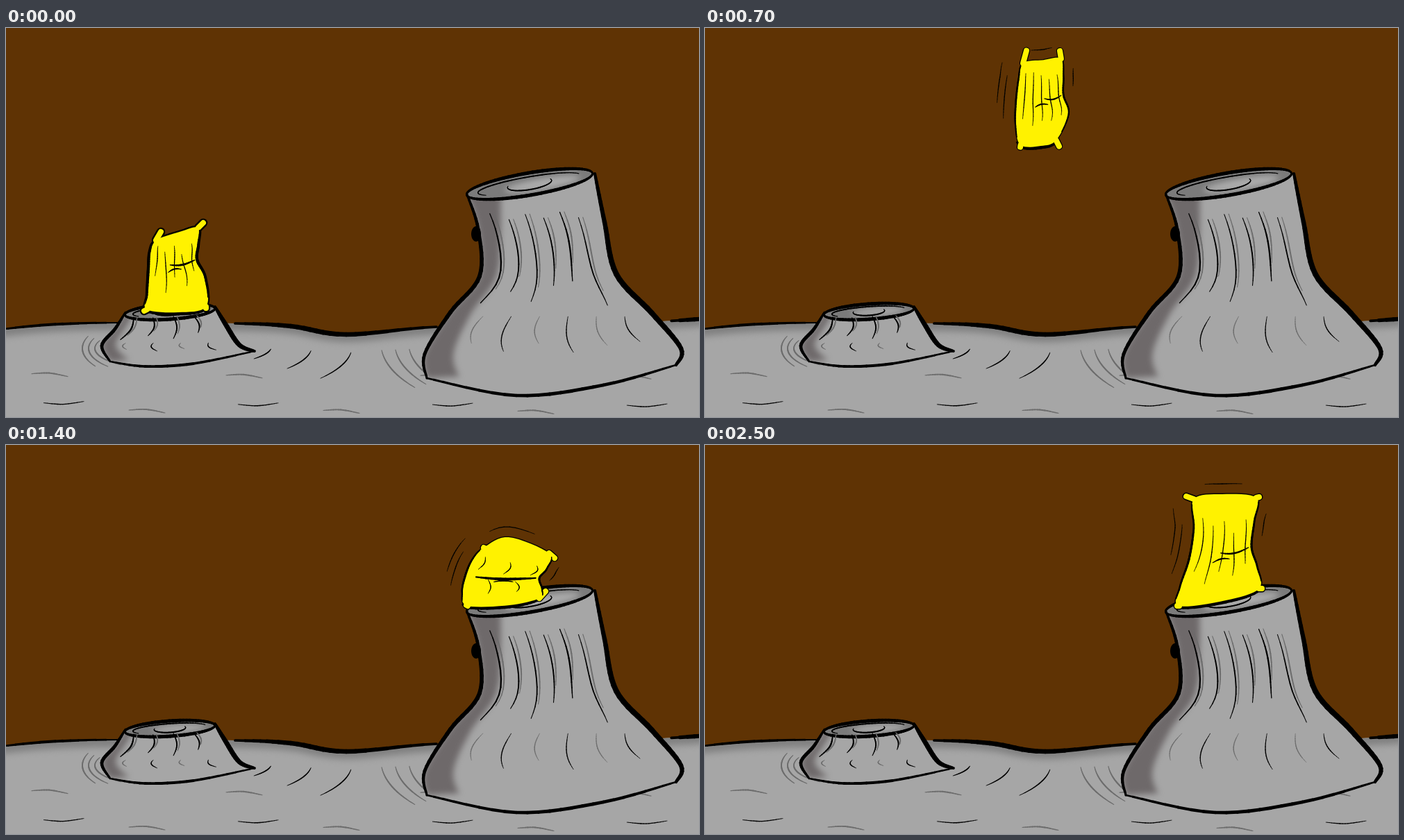
Recreate the animation shown at these times as an HTML page with a canvas. Size 998 by 561 pixels, loop 2600 ms.

```html
<!DOCTYPE html>
<html lang="en">
<head>
<meta charset="utf-8">
<title>Hopping sack</title>
<style>
html, body { margin: 0; width: 100%; height: 100%; overflow: hidden; background: #5f3304; }
canvas { display: block; width: 100vw; height: 100vh; }
</style>
</head>
<body>
<canvas id="stage" width="998" height="561"></canvas>
<script>
const W = 998, H = 561, STEP = 100, STEPS = 26, SMOOTH = 8;
const BROWN = '#5f3304', GREY = '#a6a6a6', MID = '#6d6d6d', DARK = '#6e696a', YELLOW = '#fff200';
const stage = document.getElementById('stage').getContext('2d');

const points = s => s.split(' ').map(p => p.split(',').map(Number));
const mix = (a, b, t) => a + (b - a) * t;
const mixPt = (p, q, t) => [mix(p[0], q[0], t), mix(p[1], q[1], t)];
const rnd = n => { const v = Math.sin(n * 127.1 + 3) * 43758.5; return v - Math.floor(v); };
const times = (n, f) => Array.from({ length: n }, (_, i) => f(i));

// Catmull-Rom samples through the points
function curve(pts, closed) {
  const n = pts.length, out = [], segs = closed ? n : n - 1;
  const at = i => closed ? pts[(i + n) % n] : pts[Math.max(0, Math.min(n - 1, i))];
  for (let i = 0; i < segs; i++) {
    const [a, b, c, d] = times(4, k => at(i + k - 1));
    for (let k = 0; k < SMOOTH; k++) {
      const t = k / SMOOTH;
      out.push([0, 1].map(j => b[j] + 0.5 * t * (c[j] - a[j] +
        t * (2 * a[j] - 5 * b[j] + 4 * c[j] - d[j] + t * (3 * (b[j] - c[j]) + d[j] - a[j])))));
    }
  }
  if (!closed) out.push(pts[n - 1]);
  return out;
}

// Surface between two edges: u runs across, v along them
function patch(left, right) {
  const l = curve(left), r = curve(right);
  const on = (c, v) => {
    const x = Math.max(0, Math.min(1, v)) * (c.length - 1), i = Math.min(c.length - 2, Math.floor(x));
    return mixPt(c[i], c[i + 1], x - i);
  };
  return (u, v) => mixPt(on(l, v), on(r, v), u);
}

function path(g, pts) {
  g.beginPath();
  pts.forEach(p => g.lineTo(...p));
}

function fill(g, pts, color) {
  path(g, pts);
  g.fillStyle = color;
  g.fill();
}

// Stroke along samples, thin at both ends
function pen(g, pts, width, color = '#000') {
  const n = pts.length - 1;
  g.strokeStyle = color;
  g.lineCap = 'round';
  for (let i = 0; i < n; i++) {
    g.lineWidth = width * (0.5 + 0.5 * Math.sin(Math.PI * (i + 0.5) / n));
    path(g, [pts[i], pts[i + 1]]);
    g.stroke();
  }
}

// Line on a patch, slightly bowed
const grain = (at, u, v0, v1, bow = 0) =>
  times(13, i => at(u + bow * Math.sin(Math.PI * i / 12), mix(v0, v1, i / 12)));

function arc(cx, cy, rx, ry, a0, a1, tilt = 0) {
  const c = Math.cos(tilt), s = Math.sin(tilt);
  return times(41, i => {
    const a = mix(a0, a1, i / 40), x = rx * Math.cos(a), y = ry * Math.sin(a);
    return [cx + x * c - y * s, cy + x * s + y * c];
  });
}

// Soft shading kept inside a shape
function shade(g, shape, blur, draw) {
  g.save();
  path(g, shape);
  g.clip();
  g.filter = `blur(${blur}px)`;
  draw();
  g.restore();
}

function drawGround(g) {
  const edge = curve(points('-20,436 60,428 160,425 330,426 410,430 490,442 620,431 800,428 945,423 1020,418'));
  const land = [...edge, [1020, 580], [-20, 580]];
  fill(g, land, GREY);
  shade(g, land, 5, () => {
    path(g, edge);
    g.strokeStyle = '#808080';
    g.lineWidth = 22;
    g.stroke();
  });
  const span = (a, b) => edge.filter(p => p[0] > a && p[0] < b);
  pen(g, span(-20, 165), 4);
  pen(g, span(315, 630), 7);
  pen(g, span(945, 1020), 6);

  // marks circling the stumps
  for (let i = 0; i < 3; i++) {
    pen(g, arc(240, 462, 112 + 9 * i, 32 + 9 * i, 2.3 + 0.15 * i, 3.5), 2, MID);
    pen(g, arc(240, 460, 142 + 58 * i, 30 + 25 * i, 0.1, 0.6), 1.5);
    pen(g, arc(785, 455, 205 + 20 * i, 90 + 8 * i, 2.5, 3.05), 2, MID);
  }
  // loose ripples
  for (let i = 0; i < 7; i++) {
    const x = 62 + 140 * i, y = 497 + 48 * (i % 2) + 8 * rnd(i);
    pen(g, curve([[x - 25, y], [x, y - 1], [x + 27, y + 4]]), 2, MID);
    pen(g, curve([[x - 8, y + 42], [x + 20, y + 44], [x + 50, y + 40]]), 1.4);
  }
}

function drawRim(g, { cx, cy, rx, ry, tilt }) {
  const ring = k => arc(cx, cy, rx * k, ry * k, 0, 2 * Math.PI, tilt);
  fill(g, ring(1), '#7b7b7b');
  shade(g, ring(1), 4, () => fill(g, arc(cx + rx * 0.2, cy, rx * 0.6, ry * 0.5, 0, 6.3, tilt), '#acacac'));
  pen(g, arc(cx, cy, rx, ry, 0, Math.PI, tilt), 5);
  pen(g, arc(cx, cy, rx, ry, Math.PI, 2 * Math.PI, tilt), 5);
  pen(g, arc(cx, cy, rx * 0.82, ry * 0.65, 2.6, 6, tilt), 2);
  pen(g, arc(cx, cy, rx * 0.35, ry * 0.5, -0.3, 3.4, tilt), 2);
}

function drawStump(g, { left, right, base, rim, bark, weight, dark }) {
  const l = curve(left), r = curve(right), foot = curve([right.at(-1), ...base, left.at(-1)]);
  const at = patch(left, right), body = [...l, ...[...foot].reverse(), ...[...r].reverse()];
  const rows = times(21, i => i / 20);
  fill(g, body, GREY);
  shade(g, body, 4, () => {
    const side = rows.map(v => at(0.03 + dark * (1 - v) ** 3 + 0.1 * v, v));
    fill(g, [...l, ...side.reverse()], DARK);
  });
  drawRim(g, rim);
  pen(g, l, weight);
  pen(g, r, weight + 2);
  pen(g, foot, weight - 1);
  for (let i = 0; i < bark; i++) {
    const u = 0.12 + 0.82 * i / bark, v = 0.12 + 0.06 * rnd(i), end = 0.42 + 0.14 * rnd(i + 9);
    pen(g, grain(at, u, v, end, 0.03), 1.4 + rnd(i + 5));
    pen(g, grain(at, u + 0.035, v, end - 0.08, 0.02), 2, MID);
    pen(g, grain(at, u + 0.05, 0.62, 0.68 + 0.14 * rnd(i + 2), -0.02), 1.4, i % 2 ? '#000' : MID);
  }
}

// Body from the top left corner clockwise, then the four corner tips
function pose(w, fold, speed, text) {
  const all = points(text);
  return { w, fold, speed, body: all.slice(0, 12), tips: all.slice(12) };
}

const rest = pose(3, 0.5, 0, '216,306 250,294 277,288 277,312 275,334 287,360 288,402 248,410 203,406 203,385 205,348 207,322 223,294 284,281 288,404 199,408');
const stretch = pose(1.3, 0, 1, '395,150 425,147 449,135 446,170 436,203 410,253 345,311 318,297 290,290 318,257 352,222 380,178 403,123 451,109 338,318 286,299');
const glide = pose(2, 0.5, 1, '564,32 600,28 633,36 640,62 645,94 678,115 688,150 662,176 625,176 592,142 570,100 560,60 569,16 628,33 701,164 627,175');
const crouch = pose(1.8, 1, 1, '688,148 724,133 782,156 779,178 768,192 772,208 768,221 725,231 665,232 657,213 661,190 671,166 690,149 790,163 777,211 663,231');
const lean = pose(1.8, 0.1, 1, '745,140 785,122 822,130 831,155 830,180 834,196 836,207 769,232 690,235 692,213 712,185 730,157 748,139 822,132 841,203 686,233');
const rise = pose(1.8, 0.6, 1, '712,118 765,97 824,148 812,163 799,178 797,195 800,208 750,221 700,230 684,205 686,175 694,147 713,119 827,169 802,208 685,239');
const stand = pose(2, 0.4, 1, '704,78 745,71 794,76 791,110 787,147 795,175 798,207 750,224 683,232 684,205 697,165 704,120 693,74 798,75 802,207 680,232');

// Moved, scaled and turned copy about the middle of the foot
function place(p, dx, dy, sx, sy, turn = 0) {
  const [ax, ay] = p.body[7], c = Math.cos(turn), s = Math.sin(turn);
  const move = ([x, y]) => {
    const u = (x - ax) * sx, v = (y - ay) * sy;
    return [ax + dx + u * c - v * s, ay + dy + u * s + v * c];
  };
  return { ...p, body: p.body.map(move), tips: p.tips.map(move) };
}

const keys = [
  [0, rest], [2, place(rest, 0, 0, 1.3, 0.7)], [3, place(rest, 8, -8, 0.95, 1.15, 0.12)],
  [4, place(stretch, -72, 82, 0.95, 0.95, -0.08)], [5, stretch], [6, place(stretch, 75, -125, 0.75, 0.75)],
  [8, place(glide, -88, -8, 1, 0.95, -0.08)], [10, glide], [12, place(crouch, -39, 4, 1, 1)], [14, crouch],
  [16, place(lean, -6, 0, 1, 1.24)], [18, lean], [21, rise], [25, stand]
];

function sackAt(step) {
  const i = Math.min(keys.length - 2, keys.findLastIndex(k => k[0] <= step));
  const [t0, a] = keys[i], [t1, b] = keys[i + 1], t = (step - t0) / (t1 - t0);
  const num = k => mix(a[k], b[k], t), pts = k => a[k].map((p, j) => mixPt(p, b[k][j], t));
  return { w: num('w'), fold: num('fold'), speed: num('speed'), body: pts('body'), tips: pts('tips') };
}

function drawSack(g, { w, fold, speed, body, tips }) {
  const loop = curve(body, true), n = loop.length;
  const on = i => loop[(i + n) % n];
  // part of the outline, pushed outwards by gap
  const part = (from, to, gap = 0) => times(Math.round((to - from) * SMOOTH) + 1, k => {
    const i = Math.round(from * SMOOTH) + k, [x, y] = on(i), a = on(i - 2), b = on(i + 2);
    const dx = b[0] - a[0], dy = b[1] - a[1], d = Math.hypot(dx, dy) || 1;
    return [x + gap * dy / d, y - gap * dx / d];
  });

  const corners = [0, 2, 6, 8].map(i => body[i]);
  pen(g, part(6, 8.3, 2), 5);
  g.lineJoin = g.lineCap = 'round';
  for (const [color, extra] of [['#000', 1.5 * w], [YELLOW, 0]]) {
    g.strokeStyle = color;
    g.lineWidth = 8 + extra;
    corners.forEach((c, i) => { path(g, [c, tips[i]]); g.stroke(); });
    path(g, loop);
    g.closePath();
    g.lineWidth = extra || 0.1;
    g.stroke();
    g.fillStyle = color;
    g.fill();
  }
  pen(g, part(2.3, 5.7), 1 + w);
  pen(g, part(8.5, 11.7), 1 + w);

  const at = patch([8, 9, 10, 11, 12].map(i => body[i % 12]), [6, 5, 4, 3, 2].map(i => body[i]));
  const across = (u0, u1, v, dip) => times(13, i => at(mix(u0, u1, i / 12), v + dip * Math.sin(Math.PI * i / 12)));
  if (fold > 0.2) {
    pen(g, across(0.75 - 0.6 * fold, 0.95, 0.5, -0.03), 1.5 + 2.5 * fold);
    pen(g, across(0.4, 0.65, 0.42, 0.02), 2);
  }
  for (let i = 0; i < 5; i++) {
    const v = 0.1 + 0.15 * rnd(i), reach = (0.75 - 0.5 * fold) * (0.6 + 0.4 * rnd(i + 4));
    const low = i % 2 ? v : 0.95 - v - reach;
    pen(g, grain(at, 0.14 + 0.18 * i, low, low + reach, 0.04), 1.3);
  }
  if (speed > 0.3) {
    [[9.4, 11.2, 17], [10, 11.6, 27], [0.5, 1.5, 15], [2.6, 3.5, 14]].forEach(s => pen(g, part(...s), 1.3));
  }
}

const scene = document.createElement('canvas');
scene.width = W;
scene.height = H;
const back = scene.getContext('2d');
back.fillStyle = BROWN;
back.fillRect(0, 0, W, H);
drawGround(back);
drawStump(back, {
  left: points('172,410 157,434 138,458 150,481'), right: points('301,402 316,427 336,457 358,466'),
  base: points('270,484 200,488'), rim: { cx: 236, cy: 409, rx: 65, ry: 11, tilt: -0.07 }, bark: 4, weight: 5, dark: 0.08
});
drawStump(back, {
  left: points('664,240 680,290 682,358 640,410 603,470 606,505'),
  right: points('848,210 862,280 879,355 930,411 972,462 965,486'),
  base: points('860,515 735,530'), rim: { cx: 754, cy: 225, rx: 92, ry: 16, tilt: -0.17 }, bark: 6, weight: 6, dark: 0.25
});
fill(back, arc(677, 297, 7, 11, 0, 6.3), '#000');

let shown = -1;
function frame() {
  const step = Math.floor(performance.now() / STEP) % STEPS;
  if (step !== shown) {
    shown = step;
    stage.drawImage(scene, 0, 0);
    drawSack(stage, sackAt(step));
  }
  requestAnimationFrame(frame);
}
frame();
</script>
</body>
</html>
```
